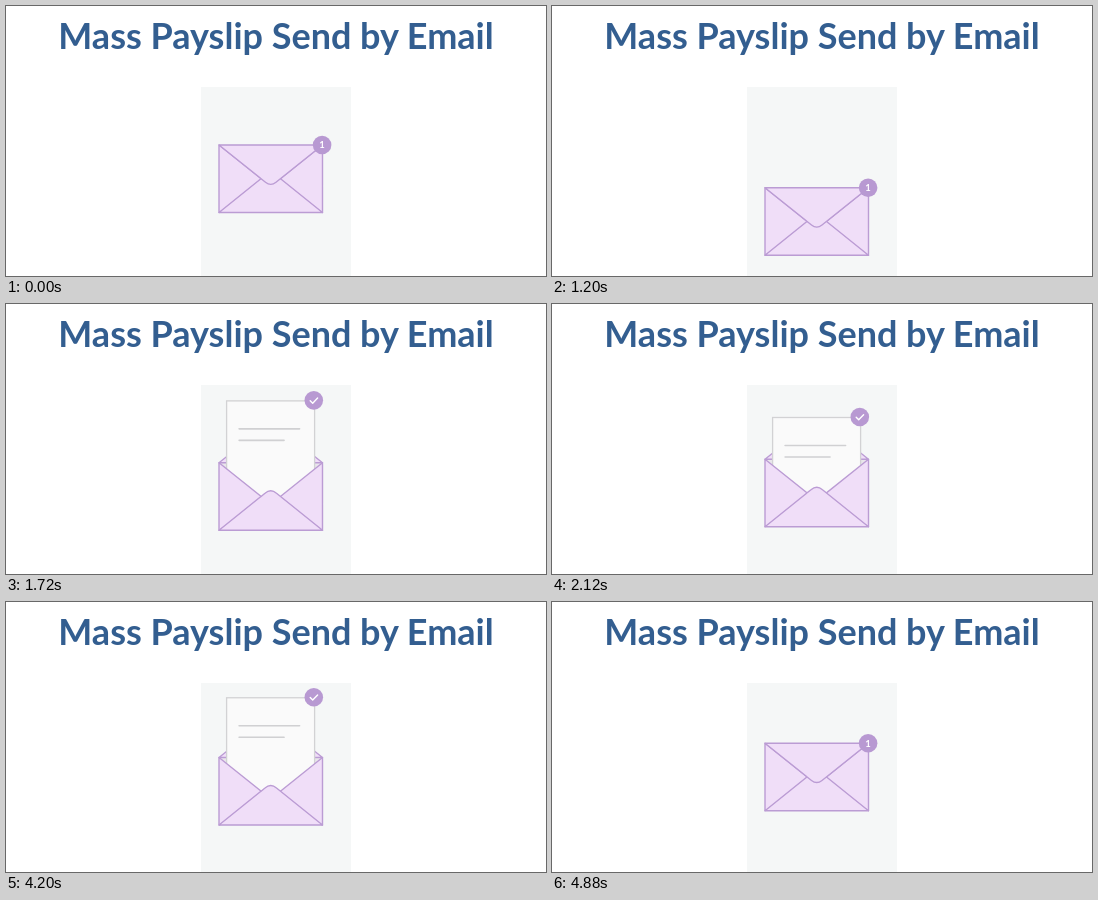
Write an HTML page that moves like this. It is 540x270 px and loops after 4.92 s.

```html
<!DOCTYPE html>
<html lang="en">
<head>
<meta charset="utf-8">
<title>Mass Payslip Send by Email</title>
<style>
  html, body { margin: 0; width: 100%; height: 100%; overflow: hidden; background: #fff; }
  svg { display: block; }
  .title { font: 700 36px Lato, sans-serif; fill: #335e90; text-anchor: middle; }
  .fold { fill: #f0def8; stroke: #bb9cd4; stroke-width: 1.4; stroke-linejoin: round; }
  .paper { fill: #fafafa; stroke: #d2d2d4; stroke-width: 1.3; }
  .rule { stroke: #d0d0d2; stroke-width: 1.6; stroke-linecap: round; }
  .spark { stroke: #bb9cd4; stroke-width: 1.4; stroke-linecap: round; }
  .count { font: 700 9.5px Lato, sans-serif; fill: #fff; text-anchor: middle; }
  .tick { fill: none; stroke: #fff; stroke-width: 1.4; stroke-linecap: round; stroke-linejoin: round; }
</style>
</head>
<body>
<svg width="540" height="270" viewBox="0 0 540 270">
  <text class="title" x="270" y="43">Mass Payslip Send by Email</text>
  <svg x="195" y="81" width="150" height="189" viewBox="195 81 150 189">
    <rect x="195" y="81" width="150" height="189" fill="#f5f7f7"/>
    <g id="sparks"></g>
    <g id="back"><rect width="103.5" height="67.5" fill="#e9e6eb"/></g>
    <g id="flapBehind"></g>
    <g id="letter">
      <rect id="sheet" class="paper" width="88" height="60"/>
      <path class="rule" d="M12.5 28H73M12.5 39.5H57.5"/>
    </g>
    <g id="front">
      <path class="fold" d="M0 0L51.75 41.4L0 67.5Z"/>
      <path class="fold" d="M103.5 0L51.75 41.4L103.5 67.5Z"/>
      <path class="fold" d="M0 67.5L46 30.5Q51.75 25.5 57.5 30.5L103.5 67.5Z"/>
    </g>
    <g id="flapFront"></g>
    <g id="badge">
      <circle r="9.3" fill="#b899d2"/>
      <text id="count" class="count" y="3.4">1</text>
      <path id="tick" class="tick" d="M-3.6 .3L-1.1 2.8L3.8 -2.3"/>
    </g>
  </svg>
</svg>
<script>
const LOOP = 4920, STEP = 40;
const LEFT = 213, RIGHT = 316.4, HEIGHT = 67.5, SHEET_X = 220.6;
const $ = id => document.getElementById(id);
const place = (id, x, y, extra = '') =>
  $(id).setAttribute('transform', `translate(${x} ${y}) ${extra}`);

const linear = p => p;
const sine = p => (1 - Math.cos(Math.PI * p)) / 2;
const cubicIn = p => p ** 3;
const cubicOut = p => 1 - (1 - p) ** 3;
const mix = (a, b, p) => a + (b - a) * p;

// Each key is [time, value, easing towards this value].
function track(keys, t) {
  const next = keys.findIndex(k => k[0] > t);
  if (next === 0) return keys[0][1];
  if (next < 0) return keys[keys.length - 1][1];
  const [t0, v0] = keys[next - 1], [t1, v1, ease = sine] = keys[next];
  return mix(v0, v1, ease((t - t0) / (t1 - t0)));
}

const envelopeTop = [[960, 139], [1240, 184], [1500, 158], [1660, 159], [2080, 155.2],
  [3840, 155.2], [4080, 154], [4360, 158], [4640, 184], [4920, 139]];
const flapFold = [[1340, 1], [1560, -1], [4360, -1], [4560, 1]];
const sheetTop = [[1500, 168], [1800, 95.5, cubicOut], [2120, 113.5],
  [3840, 113.5], [4080, 93.5], [4480, 178, cubicIn]];
const lifted = [[1500, 0], [1600, 1], [4360, 1], [4480, 0]];
const sparkShift = [[1360, -7], [1520, 7, linear], [1640, 11, cubicOut]];
const sparkFade = [[1380, 0], [1430, 1], [1560, 1], [1680, 0]];

const FLAP = 'M0 0L46.5 37.2Q51.75 41.5 57 37.2L103.5 0Z';
for (const id of ['flapBehind', 'flapFront'])
  $(id).innerHTML = `<path class="fold" d="${FLAP}"/>`;

// Angle, start and end distance from the envelope's corner.
const rays = [[-41, 8, 12], [-3, 9.5, 16.5], [40, 12, 15.5]];
function drawSparks(top, shift) {
  const line = (corner, side) => ([angle, from, to]) => {
    const a = angle * Math.PI / 180;
    const point = r => `${corner + side * r * Math.cos(a)} ${top + r * Math.sin(a)}`;
    return `<path class="spark" d="M${point(from + shift)}L${point(to + shift)}"/>`;
  };
  $('sparks').innerHTML =
    rays.map(line(LEFT, -1)).join('') + rays.map(line(RIGHT, 1)).join('');
}

function draw(t) {
  const top = track(envelopeTop, t);
  const fold = track(flapFold, t);
  const out = track(lifted, t);
  const inside = t < 1500 || t >= 4480;
  const paper = inside ? top + 9.7 : Math.min(track(sheetTop, t), top + 10);

  place('back', LEFT, top);
  place('front', LEFT, top);
  for (const id of ['flapBehind', 'flapFront']) place(id, LEFT, top, `scale(1 ${fold})`);
  $('flapBehind').style.display = fold < 0 ? '' : 'none';
  $('flapFront').style.display = fold < 0 ? 'none' : '';

  place('letter', SHEET_X, paper);
  $('sheet').setAttribute('height', top + HEIGHT - 1 - paper);

  place('badge', mix(RIGHT - .3, SHEET_X + 87.2, out), mix(top, paper - .5, out));
  $('count').style.opacity = 1 - out;
  $('tick').style.opacity = out;

  const fade = track(sparkFade, t);
  $('sparks').style.opacity = fade;
  if (fade > 0) drawSparks(top, track(sparkShift, t));
}

const start = performance.now();
function tick(now) {
  const t = Math.max(0, now - start) % LOOP;
  draw(Math.floor(t / STEP) * STEP);
  requestAnimationFrame(tick);
}
draw(0);
requestAnimationFrame(tick);
</script>
</body>
</html>
```
